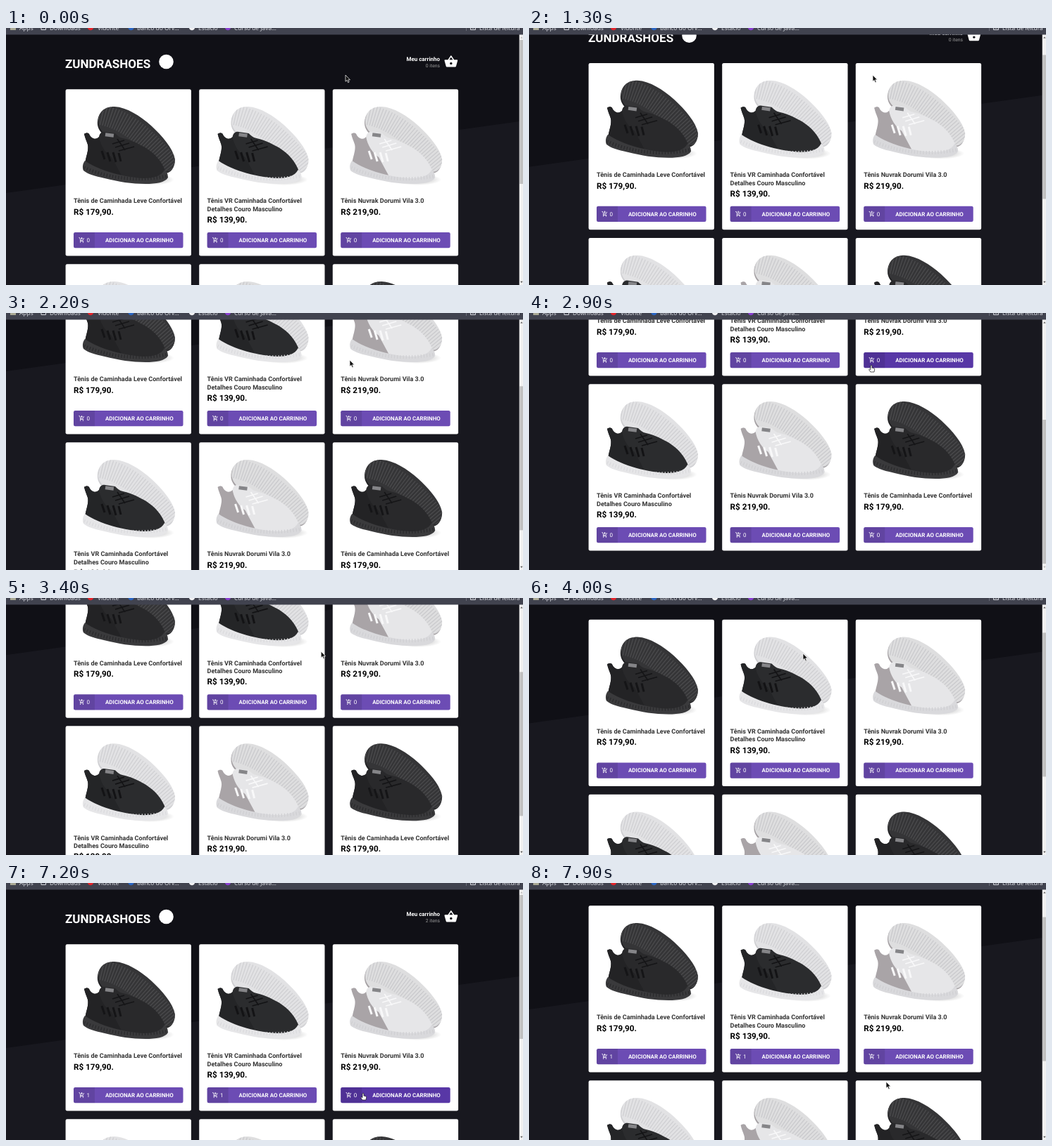
Recreate the animation shown at these times as an HTML page. Size 734 by 366 pixels, loop 8 s.

```html
<!DOCTYPE html>
<html lang="pt-BR">
<head>
<meta charset="utf-8">
<title>Loja de tênis</title>
<style>
  html, body { margin: 0; width: 100%; height: 100%; overflow: hidden; background: #191920; }
  svg { display: block; }
  text { font-family: Roboto, sans-serif; font-weight: 700; text-rendering: geometricPrecision; }
  .title { font-size: 9.05px; fill: #333; }
  .price { font-size: 11.7px; fill: #000; }
  .action { font-size: 7.97px; fill: #fff; }
  .count { font-size: 8px; font-weight: 400; fill: #fff; }
  .button { fill: #6c4cb4; }
  .button.hover { fill: #5837a6; }
  .bookmark { font: 400 8.4px "Noto Sans", sans-serif; fill: #d6d8de; }
</style>
</head>
<body>
<svg id="stage" width="734" height="366" viewBox="0 0 734 366"></svg>
<script>
const LOOP = 8000, STEP = 100;
const COL = 189.6, ROW = 249;

// [time, value...] stops, interpolated linearly
const SCROLL = [[0, 0], [1000, 0], [1700, 87], [2200, 152], [2800, 235], [2900, 235],
  [4000, 56.5], [4500, 0], [7500, 0], [7900, 55]];
const POINTER = [[0, 482, 67], [900, 482, 67], [1200, 488, 67], [2700, 488, 67], [2800, 486, 74],
  [3000, 486, 74], [4000, 389, 79], [4500, 380, 95], [5200, 225, 298], [5900, 225, 298],
  [6300, 396, 299], [6800, 396, 299], [7200, 507, 299], [7500, 507, 297], [7700, 507, 283]];
const CLICKS = [5400, 6700, 7300];

const SOLE_BACK = 'M131 136C130 120 139 112 154 112C172 113 190 125 206 139C222 154 237 171 240 187C240 200 233 207 222 204C205 198 188 182 170 168C150 158 133 150 131 136Z';
const UPPER = 'M111 151C113 149 117 149 118 151C121 158 128 160 132 155C133 149 137 147 141 148L155 150C158 153 161 156 166 157C180 160 190 166 199 171C211 179 222 190 227 206C222 216 205 218 195 217C170 216 135 208 112 194C113 184 118 174 116 166C114 160 112 156 111 151Z';
const SOLE = 'M112 189C109 193 108 198 110 203C116 208 126 211 140 214C160 219 178 222 198 222C213 222 226 220 230 213C230 208 228 204 225 202C221 211 208 214 196 214C170 213 133 204 112 189Z';
const HEEL = 'M111 151C113 149 117 149 118 151C121 158 128 160 132 155C134 167 141 178 150 184L164 210C145 207 125 201 112 194C113 184 118 174 116 166C114 160 112 156 111 151Z';
const CART = 'M11 9h2V6h3V4h-3V1h-2v3H8v2h3v3zm-4 9c-1.1 0-2 .9-2 2s.9 2 2 2 2-.9 2-2-.9-2-2-2zm10 0c-1.1 0-2 .9-2 2s.9 2 2 2 2-.9 2-2-.9-2-2-2zm-9.8-3.25l.03-.12.9-1.63h7.42c.75 0 1.41-.41 1.75-1.03l3.86-7.01L19.42 4l-1.1 2-2.76 5H8.53L6.16 6 4.27 2H1v2h2l3.6 7.59-1.35 2.45c-.16.28-.25.61-.25.96 0 1.1.9 2 2 2h12v-2H7.42c-.13 0-.25-.11-.25-.25z';
const BASKET = 'M17.2 9l-4.4-6.56c-.4-.56-1.24-.56-1.66 0L6.8 9H2c-.55 0-1 .45-1 1l2.58 9.54C3.8 20.4 4.6 21 5.5 21h13c.92 0 1.7-.62 1.93-1.46L23 10c0-.55-.45-1-1-1h-4.8zM9 9l3-4.4L15 9H9zm3 8c-1.1 0-2-.9-2-2s.9-2 2-2 2 .9 2 2-.9 2-2 2z';

const PRODUCTS = {
  black: { lines: ['Tênis de Caminhada Leve Confortável'], price: '179,90', dy: 0,
    back: '#353537', rib: '#4b4b4d', edge: '#222224', upper: '#29292b', heel: '#232325', sole: '#3a3a3c', detail: '#151517', groove: '#29292b' },
  mixed: { lines: ['Tênis VR Caminhada Confortável', 'Detalhes Couro Masculino'], price: '139,90', dy: 0,
    back: '#e2e2e4', rib: '#d0d0d3', edge: '#cfcfd2', upper: '#2b2c2e', heel: '#242527', sole: '#e6e6e8', detail: '#131315', groove: '#dadadd' },
  light: { lines: ['Tênis Nuvrak Dorumi Vila 3.0'], price: '219,90', dy: 0,
    back: '#dededf', rib: '#cacacd', edge: '#a5a1a4', upper: '#e6e6e8', heel: '#a9a4a7', sole: '#d9d9dc', detail: '#f8f8f9', groove: '#cfcfd2' }
};
const SHELF = ['black', 'mixed', 'light', 'mixed', 'light', 'black'];

const path = (d, attrs) => `<path d="${d}" ${attrs}/>`;
const text = (x, y, cls, content, extra = '') => `<text x="${x}" y="${y}" class="${cls}" ${extra}>${content}</text>`;
const stroke = (color, width, dash = '') => `fill="none" stroke="${color}" stroke-width="${width}" stroke-dasharray="${dash}"`;

function shoe(p) {
  return `<g transform="translate(0 ${p.dy})">
    <ellipse cx="205" cy="216" rx="34" ry="8" fill="url(#shade)"/>
    ${path(SOLE_BACK, `fill="${p.edge}" transform="translate(-1 2)"`)}
    ${path(SOLE_BACK, `fill="${p.back}"`)}
    <g clip-path="url(#tread)">${path('M132 123C168 130 195 149 238 202', stroke(p.rib, 29, '1.3 2.7'))}</g>
    ${path(UPPER, `fill="${p.upper}"`)}
    ${path(HEEL, `fill="${p.heel}"`)}
    ${path('M136 175L140 187M144 177L148 190M152 177L156 191M160 178L163 190', stroke(p.detail, 3))}
    ${path('M151 165L168 160M155 170L175 164M160 175L182 169M158 158L169 174', stroke(p.detail, 1.6))}
    ${path(SOLE, `fill="${p.sole}"`)}
    ${path('M111 199C140 212 180 220 228 211', stroke(p.groove, 5, '1.2 3'))}
    <rect x="141" y="150" width="12" height="5" fill="#858588" transform="rotate(8 147 152)"/>
  </g>`;
}

function card(key, i) {
  const p = PRODUCTS[key], drop = (p.lines.length - 1) * 11.4;
  return `<g transform="translate(${i % 3 * COL} ${Math.floor(i / 3) * ROW})">
    <rect x="84.6" y="87.2" width="178.3" height="237.3" rx="2.3" fill="#fff"/>
    ${shoe(p)}
    ${p.lines.map((line, n) => text(96, 249.4 + n * 11.4, 'title', line)).join('')}
    ${text(96, 265.8 + drop, 'price', `R$ ${p.price}.`)}
    <rect class="button" x="96" y="291" width="155.5" height="22.3" rx="2.3"/>
    <path d="M126 291H98.3Q96 291 96 293.3V311Q96 313.3 98.3 313.3H126Z" fill="#000" fill-opacity=".1"/>
    ${path(CART, 'fill="#fff" transform="translate(103 297.5) scale(.38)"')}
    ${text(114.5, 304.9, 'count', '0')}
    ${text(141, 304.9, 'action', 'ADICIONAR AO CARRINHO')}
  </g>`;
}

const bookmarks = [[19, 'Apps'], [62, 'Downloads'], [130, 'Vidonte'], [186, 'Banco do Orv…'],
  [273, 'Estácio'], [324, 'Curso de Java…'], [672, 'Lista de leitura']];
const dots = [[120, '#e3242b'], [177.5, '#2b66c4'], [264, '#f0f0f2'], [315, '#8a3fd1']];

document.getElementById('stage').innerHTML = `
  <clipPath id="tread">${path(SOLE_BACK, '')}</clipPath>
  <radialGradient id="shade"><stop stop-opacity=".3"/><stop offset="1" stop-opacity="0"/></radialGradient>
  <rect width="734" height="366" fill="#18181f"/>
  <g id="page">
    ${path('M0 0H729V133L0 235Z', 'fill="#101016"')}
    ${text(84, 57, '', 'ZUNDRASHOES', 'font-size="17" fill="#fff"')}
    <circle cx="227.5" cy="48" r="10.3" fill="#fff"/>
    ${text(616, 47.2, 'action', 'Meu carrinho', 'text-anchor="end"')}
    <text id="total" x="616" y="56" text-anchor="end" style="font-size:6.8px;font-weight:400" fill="#999"></text>
    ${path(BASKET, 'fill="#fff" transform="translate(621.6 37.6) scale(.854)"')}
    ${SHELF.map(card).join('')}
  </g>
  <rect x="728.7" y="9" width="5.3" height="357" fill="#f1f1f1"/>
  <rect id="thumb" x="729.2" y="17" width="4.8" height="205" fill="#c1c1c1"/>
  <path id="up" d="M730.2 14.6h3.4l-1.7-2.2z"/>
  <path id="down" d="M730.2 360.8h3.4l-1.7 2.2z"/>
  <rect width="734" height="9.5" fill="#41434f"/>
  <rect x="6" y="-4" width="8" height="7" fill="#a9a894"/>
  <path d="M50 -3V2.5H56.5V-3" ${stroke('#d6d8de', 1)}/>
  <path d="M659.5 -3V2.5H666.5V-3M661 0H665" ${stroke('#d6d8de', 1)}/>
  <rect x="653" width="1" height="4" fill="#6c6e7a"/>
  ${dots.map(([x, c]) => `<circle cx="${x}" cy="-1" r="4.2" fill="${c}"/>`).join('')}
  ${bookmarks.map(([x, label]) => text(x, 2.6, 'bookmark', label)).join('')}
  <g id="pointer" stroke-linejoin="round">
    <path id="arrow" d="M0 0V9.2L2.1 7.3 3.6 10.7 5.2 10 3.7 6.8H6.5Z" fill="#111" stroke="#fff" stroke-width=".7"/>
    <path id="hand" d="M-1 1Q0 -.6 1 1V4L4 4.8Q4.8 5 4.7 6.2L4 10H-1.2L-3.4 6.6Q-3.2 5.3 -1 6.5Z" fill="#fff" stroke="#111" stroke-width=".7"/>
  </g>`;

const byId = id => document.getElementById(id);
const buttons = [...document.querySelectorAll('.button')];
const counts = [...document.querySelectorAll('.count')];

function sample(stops, t) {
  const next = stops.findIndex(s => s[0] > t);
  if (next < 0) return stops[stops.length - 1].slice(1);
  const a = stops[next - 1], b = stops[next], k = (t - a[0]) / (b[0] - a[0]);
  return a.slice(1).map((v, i) => v + (b[i + 1] - v) * k);
}

function draw(t) {
  const [scroll] = sample(SCROLL, t), [x, y] = sample(POINTER, t);
  byId('page').setAttribute('transform', `translate(0 ${-scroll})`);
  byId('thumb').setAttribute('y', 17 + scroll * 135 / 235);
  byId('up').setAttribute('fill', scroll > 0 ? '#505050' : '#b5b5b5');
  byId('down').setAttribute('fill', scroll < 235 ? '#505050' : '#b5b5b5');

  let over = false;
  buttons.forEach((button, i) => {
    const dx = x - 96 - i % 3 * COL, dy = y + scroll - 291 - Math.floor(i / 3) * ROW;
    const hit = dx >= 0 && dx <= 155.5 && dy >= 0 && dy <= 22.3;
    button.classList.toggle('hover', hit);
    over = over || hit;
  });
  CLICKS.forEach((at, i) => { counts[i].textContent = t >= at ? 1 : 0; });
  const total = CLICKS.filter(at => t >= at).length;
  byId('total').textContent = total + (total === 1 ? ' item' : ' itens');

  byId('pointer').setAttribute('transform', `translate(${x} ${y})`);
  byId('arrow').setAttribute('visibility', over ? 'hidden' : 'visible');
  byId('hand').setAttribute('visibility', over ? 'visible' : 'hidden');
}

function tick() {
  draw(Math.floor(performance.now() % LOOP / STEP) * STEP);
  requestAnimationFrame(tick);
}
tick();
</script>
</body>
</html>
```
